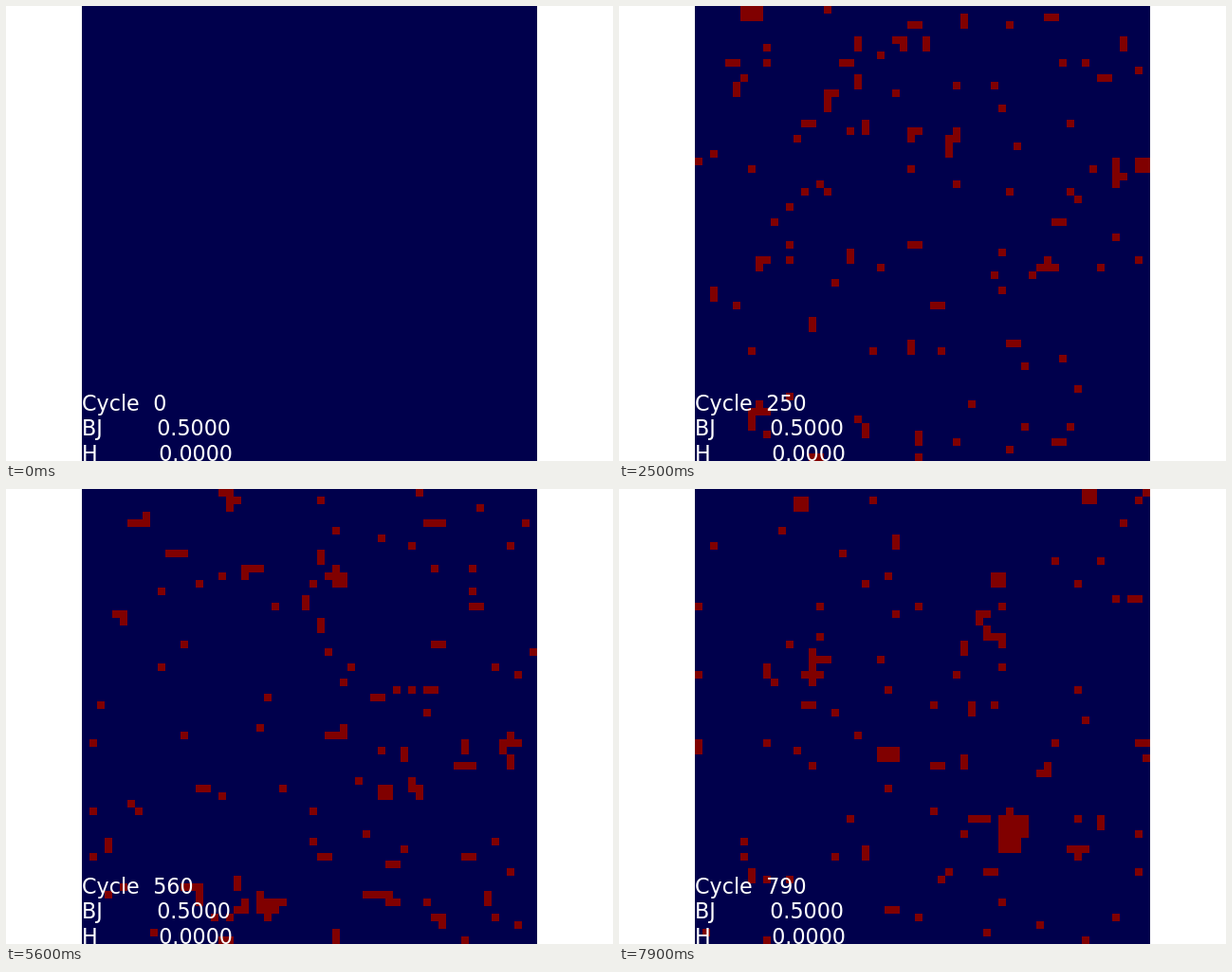
Recreate the animation shown at these times as an HTML page with a canvas. Size 640 by 480 pixels, loop 8000 ms.

```html
<!DOCTYPE html>
<html lang="en">
<head>
<meta charset="utf-8">
<title>Ising model</title>
<style>
  html, body { margin: 0; width: 100%; height: 100%; overflow: hidden; background: #fff; }
  canvas { display: block; }
</style>
</head>
<body>
<canvas id="stage" width="640" height="480"></canvas>
<script>
const N = 60, CELL = 8, LEFT = 80;
const STEPS = 80, STEP_MS = 100, SWEEPS = 10;
const BJ = 0.5, H = 0;
const DOWN = '#00004c', UP = '#800000';

const ctx = document.getElementById('stage').getContext('2d');

function makeRandom(seed) {
  return () => {
    seed = (seed + 0x6D2B79F5) | 0;
    let t = Math.imul(seed ^ (seed >>> 15), 1 | seed);
    t = (t + Math.imul(t ^ (t >>> 7), 61 | t)) ^ t;
    return ((t ^ (t >>> 14)) >>> 0) / 4294967296;
  };
}

// Metropolis sweeps on a periodic lattice, all spins down at the start
function simulate() {
  const random = makeRandom(140);
  const spins = new Int8Array(N * N).fill(-1);
  const states = [spins.slice()];
  while (states.length < STEPS) {
    for (let k = 0; k < SWEEPS * N * N; k++) {
      const i = Math.floor(random() * N * N);
      const x = i % N, row = i - x;
      const sum = spins[row + (x + 1) % N] + spins[row + (x + N - 1) % N] +
        spins[(i + N) % (N * N)] + spins[(i + N * N - N) % (N * N)];
      const cost = 2 * spins[i] * (BJ * sum + H);
      if (cost <= 0 || random() < Math.exp(-cost)) spins[i] = -spins[i];
    }
    states.push(spins.slice());
  }
  return states;
}

function drawRow(label, value, valueX, y) {
  ctx.fillText(label, LEFT, y);
  ctx.fillText(value, valueX, y);
}

function draw(step) {
  ctx.fillStyle = '#fff';
  ctx.fillRect(0, 0, 640, 480);
  ctx.fillStyle = DOWN;
  ctx.fillRect(LEFT, 0, N * CELL, N * CELL);

  ctx.fillStyle = UP;
  states[step].forEach((s, i) => {
    if (s > 0) ctx.fillRect(LEFT + (i % N) * CELL, Math.floor(i / N) * CELL, CELL, CELL);
  });

  ctx.fillStyle = '#fff';
  ctx.font = '22.22px "DejaVu Sans", sans-serif';
  drawRow('Cycle', String(step * SWEEPS), 155.2, 427);
  drawRow('BJ', BJ.toFixed(4), 159.2, 453);
  drawRow('H', H.toFixed(4), 161.2, 480);
}

const states = simulate();
let shown = -1;

function tick() {
  const step = Math.floor(performance.now() / STEP_MS) % STEPS;
  if (step !== shown) draw(shown = step);
  requestAnimationFrame(tick);
}
tick();
</script>
</body>
</html>
```
